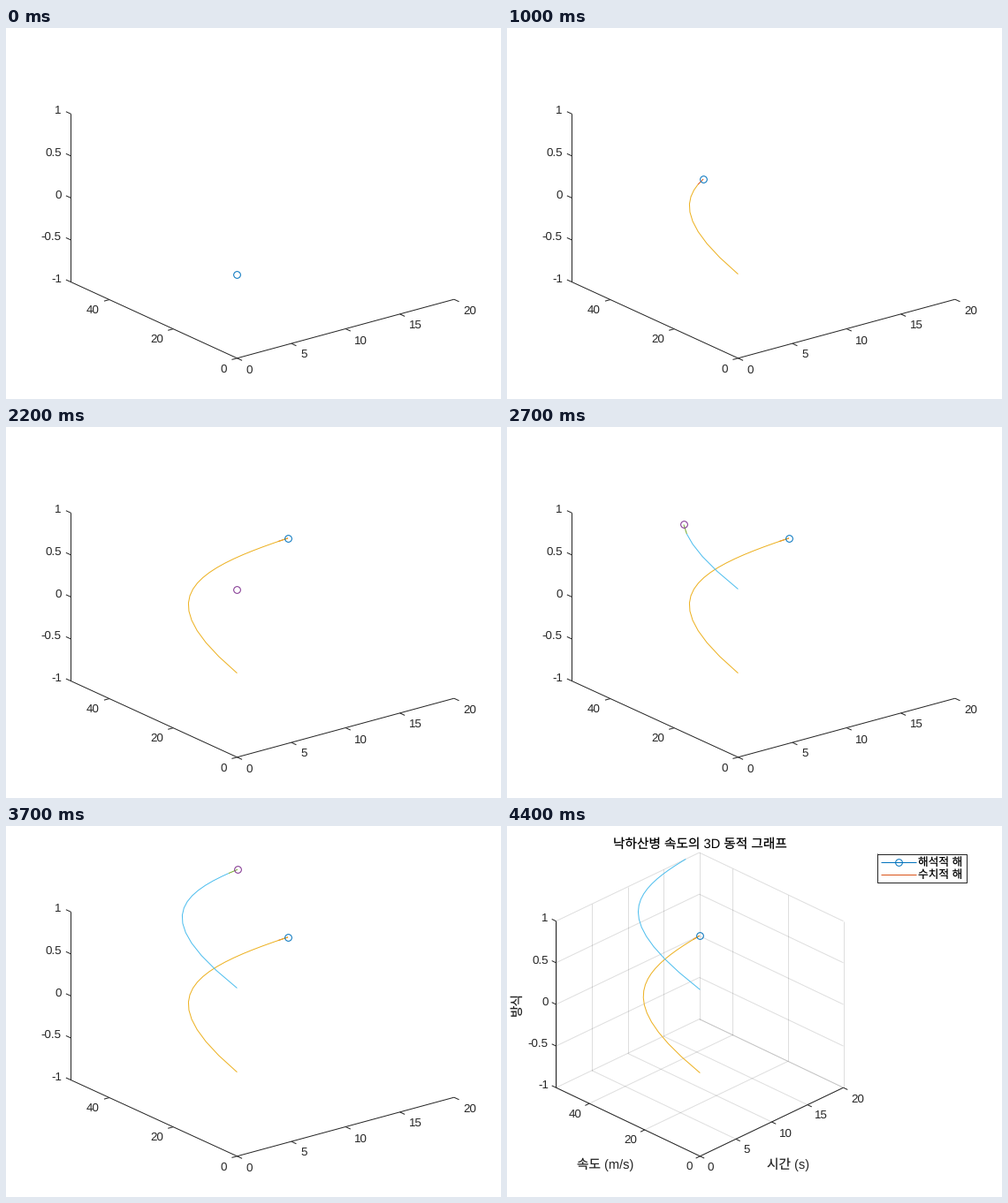
Recreate the animation shown at these times as a matplotlib script. Size 560x420 px, loop 4500 ms.

```python
import numpy as np
import matplotlib.pyplot as plt
from matplotlib.animation import FuncAnimation

W, H, DPI = 560, 420, 100
PX = 72 / DPI
INK = "#262626"
BLUE, RED, GOLD = "#0072BD", "#D95319", "#EDB120"
PURPLE, GREEN, SKY = "#7E2F8E", "#77AC30", "#4DBEEE"
plt.rcParams["font.family"] = ["Liberation Sans", "Noto Sans CJK JP"]
plt.rcParams["text.hinting"] = "none"

# Falling parachutist: exact velocity and its Euler approximation
G, M, C, T_END = 9.8, 68.1, 12.5, 20
time = np.arange(T_END + 1)
exact = G * M / C * (1 - np.exp(-C / M * time))
euler = G * M / C * (1 - (1 - C / M) ** time)
V_MAX = exact[-1]
X_TICKS, Y_TICKS, Z_TICKS = (0, 5, 10, 15, 20), (0, 20, 40), (-1, -0.5, 0, 0.5, 1)


class View:
    """Parallel projection given by the corners of the axes box."""

    def __init__(self, front, right, left, height, tick, gaps, drops):
        self.front = np.array(front)
        self.ex = np.array(right) - self.front
        self.ey = np.array(left) - self.front
        self.ez = np.array([0, -height])
        self.tick, self.gaps, self.drops = tick, gaps, drops

    def at(self, t, v, z):
        t, v, z = np.broadcast_arrays(t, v, z)
        parts = ((t / T_END, self.ex), (v / V_MAX, self.ey), ((z + 1) / 2, self.ez))
        return self.front + sum(np.multiply.outer(s, e) for s, e in parts)


WIDE = View((261.4, 373.8), (506.9, 307.2), (73.5, 287.6), 190.3, 6.2,
            (10.2, 11.3, 10.6), (17, 15.6, 0))
GRID = View((218.4, 373.8), (380.5, 296.2), (55.5, 296.2), 188.5, 5.3,
            (8.4, 8.8, 8.6), (16.5, 15.3, 0.8))

fig = plt.figure(figsize=(W / DPI, H / DPI), dpi=DPI, facecolor="white")
ax = fig.add_axes([0, 0, 1, 1])


def stroke(pts, color=INK, alpha=1):
    pts = np.asarray(pts)
    ax.plot(pts[:, 0], pts[:, 1], color=color, alpha=alpha, lw=PX,
            solid_capstyle="butt")


def ring(p, color):
    ax.plot(*p, "o", ms=7.7 * PX, mfc="none", mec=color, mew=PX)


def label(x, y, text, size=13.33, color=INK, **kw):
    kw = {"ha": "center", "va": "baseline", **kw}
    ax.text(x, y, text, fontsize=size * PX, color=color, **kw)


def draw_axes(view):
    dx, dy = (e / np.hypot(*e) * view.tick for e in (view.ex, view.ey))
    gx, gy, gz = view.gaps
    hx, hy, hz = view.drops
    stroke(view.at([T_END, 0, 0, 0], [0, 0, V_MAX, V_MAX], [-1, -1, -1, 1]))
    for t in X_TICKS:
        p = view.at(t, 0, -1)
        stroke([p, p - dy])
        label(p[0] + gx, p[1] + hx, f"{t}", ha="left")
    for v in Y_TICKS:
        p = view.at(0, v, -1)
        stroke([p, p - dx])
        label(p[0] - gy, p[1] + hy, f"{v}", ha="right")
    for z in Z_TICKS:
        p = view.at(0, V_MAX, z)
        stroke([p, p + dy])
        label(p[0] - gz, p[1] + hz, f"{z:g}", ha="right")


def draw_grid(view):
    def rule(t, v, z):
        stroke(view.at(t, v, z), INK, 0.15)

    for t in X_TICKS:
        rule([t, t], [0, V_MAX], -1)
        rule([t, t], V_MAX, [-1, 1])
    for v in Y_TICKS:
        rule([0, T_END], [v, v], -1)
        rule(T_END, [v, v], [-1, 1])
    for z in Z_TICKS:
        rule([0, T_END], V_MAX, [z, z])
        rule(T_END, [0, V_MAX], [z, z])


def draw_path(view, v, z, first, last, color):
    """Polyline between two samples, cut off at the upper speed limit."""
    t = np.linspace(first, last, 60 * (last - first) + 1)
    s = np.interp(t, time, v)
    keep = s <= V_MAX + 1e-9
    if last > first and keep.any():
        stroke(view.at(t[keep], s[keep], z), color)


def draw_comet(view, v, z, step, head, body, tail):
    n = min(step, T_END)
    back = max(n - 1, 0)
    draw_path(view, v, z, back, n, body)
    draw_path(view, v, z, 0, n if step > T_END else back, tail)
    if v[n] <= V_MAX + 1e-9:
        ring(view.at(n, v[n], z), head)


def draw_captions():
    label(218.3, 25, "낙하산병 속도의 3D 동적 그래프", 14.67, "black")
    label(318, 388, "시간 (s)", 14.67)
    label(111, 388, "속도 (m/s)", 14.67)
    label(11.5, 201.5, "방식", 14.67, rotation=90, va="center")
    stroke([(419, 31.5), (519.5, 31.5), (519.5, 63.5), (418.5, 63.5), (418.5, 31)])
    for y, color, text in ((40.5, BLUE, "해석적 해"), (54.5, RED, "수치적 해")):
        stroke([(422.5, y), (462.5, y)], color)
        label(465, y + 4.2, text, 12.7, "black", ha="left")
    ring((442.5, 40.5), BLUE)


def update(i):
    ax.clear()
    ax.set(xlim=(0, W), ylim=(H, 0))
    ax.axis("off")
    final = i == FRAMES - 1
    view = GRID if final else WIDE
    if final:
        draw_grid(view)
    draw_axes(view)
    draw_comet(view, exact, 0, i, BLUE, RED, GOLD)
    if i >= LAP:
        draw_comet(view, euler, 1, i - LAP, PURPLE, GREEN, SKY)
    if final:
        draw_captions()
    return []


LAP = T_END + 2
FRAMES = 2 * LAP + 1
anim = FuncAnimation(fig, update, frames=FRAMES, init_func=lambda: [],
                     interval=100, repeat=True, repeat_delay=0)
plt.show()
```
